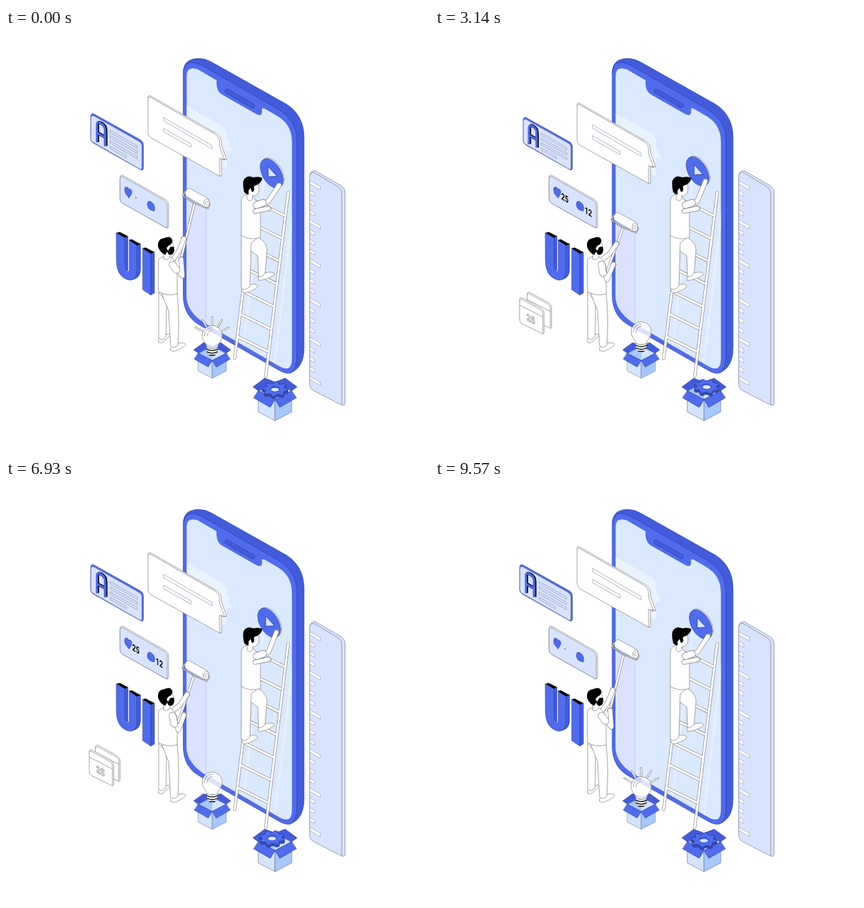
An HTML page for the animation above (9.64 s loop, 640 px wide and 640 px high).

```html
<!DOCTYPE html>
<html lang="en">
<head>
<meta charset="utf-8">
<title>Building an app interface</title>
<style>
  html, body { margin: 0; height: 100%; overflow: hidden; background: #fff; }
  svg { display: block; width: 100vw; height: 100vh; }
  path, ellipse, circle { stroke-linejoin: round; stroke-linecap: round; }
  .blue { fill: #4f6cef; stroke: #2b3c94; stroke-width: .6; }
  .dark { fill: #415bdb; stroke: #2b3c94; stroke-width: .6; }
  .pale { fill: #d8e3ff; stroke: #6f7890; stroke-width: .7; }
  .white { fill: #fff; stroke: #777; stroke-width: .7; }
  .line { fill: none; stroke: #777; stroke-width: .7; }
  .bar { fill: none; stroke: #8a93aa; stroke-width: .7; }
  .edge { fill: none; stroke: #777; }
  .core { fill: none; stroke: #fff; }
  text { font: bold 14px Roboto, sans-serif; text-anchor: middle; }
</style>
</head>
<body>
<svg viewBox="0 0 640 640">
  <defs>
    <path id="screenShape" d="M273 72Q273 57 290 62L319 79V86Q320 97 328 101L379 130Q387 134 387 127V122Q388 120 392 122L411 133Q433 146 433 172V500Q433 522 415 513L306 450Q273 431 273 405Z"/>
    <clipPath id="screen"><use href="#screenShape"/></clipPath>
    <path id="bubbleShape" d="M215 105Q215 101 219 103L317 159Q325 164 326 171V177L334 199L326 198V224L323 224L219 166Q215 163 215 159Z"/>
    <g id="calendar">
      <path class="white" d="M-18.500-25Q-18.500-29-15-28L14-12Q18.500-9 18.500-5V24Q18.500 28 15 26L-15 11Q-18.500 9-18.500 5Z"/>
      <path class="line" d="M-18.500-24Q-18-27-14-25L13-10Q16.500-8 16.500-4V26M-18.500-17L16.500 1"/>
      <text transform="matrix(.82 .47 0 1 -1.500 9)" fill="none" stroke="#777" stroke-width=".7">25</text>
    </g>
    <g id="boxBack">
      <path d="M-21-11L0-22V0Z" fill="#a6c7ff"/>
      <path d="M0-22L21-11L0 0Z" fill="#d3e4ff"/>
      <path d="M-21-11L0 0V27L-21 16Z" fill="#d3e4ff" stroke="#6f7890" stroke-width=".6"/>
      <path d="M21-11L0 0V27L21 16Z" fill="#a6c7ff" stroke="#6f7890" stroke-width=".6"/>
      <path class="dark" d="M-21-11L-28-16L-13-27L0-22ZM21-11L28-16L13-27L0-22Z"/>
    </g>
    <path id="boxFront" class="blue" d="M-21-11L0 0L-6 10L-27-2ZM21-11L0 0L6 10L27-2Z"/>
  </defs>

  <!-- phone -->
  <path class="dark" d="M268 68Q268 46 292 46Q302 46 312 52L424 115Q451 132 451 166V484Q451 514 430 522Z"/>
  <path class="blue" d="M268 70Q269 43 297 57L412 123Q440 140 440 170V496Q440 532 415 519L292 449Q268 435 268 404Z"/>
  <use href="#screenShape" fill="#dbe9ff" stroke="#4459b8" stroke-width=".6"/>
  <path d="M334.500 95.500L373 117.500" fill="none" stroke="#2b3c94" stroke-width="7"/>
  <path d="M334.500 95.500L373 117.500" fill="none" stroke="#415bdb" stroke-width="6"/>
  <g clip-path="url(#screen)">
    <path id="paint" fill="#dae2ff" stroke="#b4bff0" stroke-width=".7"/>
    <use id="reflection" href="#bubbleShape" fill="#fff" opacity=".38"/>
    <path d="M358 492L391 221M405 519L439 240" fill="none" stroke="#fff" stroke-width="3" opacity=".3"/>
  </g>

  <!-- speech bubble -->
  <g id="bubble">
    <use href="#bubbleShape" class="white"/>
    <path class="line" d="M215 106Q216 103 219 105L315 160Q323 165 323 172V179L331 200L323 197V224"/>
    <path class="bar" d="M238.500 135.500L312 178V183L238.500 140.500ZM238.500 152L280 175.500V180.500L238.500 157Z"/>
  </g>

  <!-- profile card -->
  <g id="profile">
    <path class="blue" d="M128 135Q128 128 133 130L203 169Q208 172 208 178V211Q208 217 203 214L132 174Q128 171 128 168Z"/>
    <path class="pale" d="M128.500 137Q128.500 131 133 133L201 171.500Q205.500 174 205.500 179V211Q205.500 215 202 213L132 173Q128.500 171 128.500 168Z"/>
    <g fill="none" stroke="#0a0d22" stroke-width="5" style="stroke-linecap:butt">
      <path id="letter" d="M137.500 173V148Q137.500 141 143.500 144.500Q150 148 150 156V179M137.500 159L150 166" transform="translate(1 -.4)" style="stroke-linecap:butt"/>
    </g>
    <use href="#letter" x="-1" fill="none" stroke="#4f6cef" stroke-width="3.200"/>
    <path id="cardLines" class="bar"/>
  </g>

  <!-- reactions card -->
  <path class="white" d="M172.500 227Q173 221 177 223L242 260Q246 263 246 268V299Q246 304 242 302L176 265Q172.500 263 172.500 259Z"/>
  <path class="pale" d="M172.500 228Q173 223 177 225L240 261Q244 264 244 269V302L242 302L176 265Q172.500 263 172.500 259Z"/>
  <path class="blue" d="M186 257L180.500 250Q178 241 182 240.500Q184.500 240.500 186 244Q188 242 190 246Q191.500 251 186 257Z"/>
  <g id="chat"><path class="blue" d="M214 267Q214 260 219.500 263Q225 266.500 225 272L224.500 277L220.500 276Q214 274 214 267Z"/></g>
  <g id="likes"><text transform="matrix(.68 .42 0 1 0 5)">25</text></g>
  <g id="replies"><text transform="matrix(.68 .42 0 1 0 5)">12</text></g>

  <!-- UI letters -->
  <path class="dark" d="M180 317L184.500 315V367H180ZM198 328L203.500 326V366Q203 380 188 381L184 378Z"/>
  <path class="blue" d="M167 310L180 317V360Q181 367 184 368.500Q186.500 369 186.500 365V320L198 327V367Q198 384 184 381Q167 375 167 352Z"/>
  <path class="dark" d="M219 341L224.500 339V401L219 404Z"/>
  <path class="blue" d="M207 333L219 341V404L207 396Z"/>
  <path d="M167 310L172 308.500L184.500 315L180 317.500ZM186 321L190 319.500L203.500 327L198 329ZM207 333.500L211 332L224.500 339L219 341.500Z"/>
  <g id="calendars"></g>

  <!-- ruler -->
  <path class="pale" d="M459.500 224Q460 215 468 216L506 238Q513 242 513 250V567Q513 572 508 570.500L466 549Q459.500 546 459.500 538Z"/>
  <path class="line" d="M460 222Q462 217 467 219L502 240Q508 243 508 251V570.500"/>
  <path id="marks" fill="#fff" stroke="#8a93aa" stroke-width=".6"/>

  <!-- play button -->
  <g id="play">
    <circle r="20" class="white" transform="matrix(.866 .5 0 1 1.500 -1)"/>
    <g transform="matrix(.866 .5 0 1 0 0)">
      <circle r="20" class="blue"/>
      <path d="M-6-7V8L9 0Z" fill="#d8e6ff" stroke="#2b3c94" stroke-width=".8"/>
    </g>
  </g>

  <!-- ladder and climber -->
  <g id="ladder"></g>
  <path class="white" d="M382 382Q380 377 384 375L394 370Q405 368 406 372Q406 375 393 380Z"/>
  <path class="white" d="M368 316L382 317Q395 325 395 336L392 371Q388 377 382 376L381 345L366 334Z"/>
  <path class="white" d="M357 398Q355 393 359 391L369 388Q380 386 381 391Q380 394 368 399Q361 403 357 398Z"/>
  <path class="white" d="M356 312V394Q362 398 369 391L371 325L380 318Z"/>
  <path class="white" d="M357 257Q363 248 372 254L379 262Q385 268 385 282V317Q370 322 356 314V264Z"/>
  <path class="white" d="M365 244L382 236Q384 245 381 250Q378 255 373 254V259Q369 264 365 259Z"/>
  <path d="M360 247Q357 232 361 228Q366 222 374 226Q383 224 388 227Q386 236 377 238L375 240Q377 248 372 248L370 242L367 246V252Q361 251 360 247Z"/>
  <g id="climberGrip"></g>
  <g id="climberReach"></g>

  <!-- roller and painter -->
  <g id="stick"></g>
  <g id="roller">
    <path d="M271 247L268 254L285 265L305 273L308 267" fill="none" stroke="#555e78" stroke-width="2.400"/>
    <path d="M271 247L268 254L285 265L305 273L308 267" class="core" stroke-width="1"/>
    <path class="white" d="M272 254Q269 246 277 242L306 258Q309 264 305 271L301 271Z"/>
    <ellipse class="white" cx="303.500" cy="265" rx="4.300" ry="6.200"/>
    <path class="line" d="M305 266Q302 269 301.500 265Q303 260 306 264"/>
  </g>
  <g id="farArm"></g>
  <path class="white" d="M231 475Q229 471 233 469L240 464Q249 462 249 465L238 475Q233 478 231 475Z"/>
  <path class="white" d="M249 487Q248 483 252 481L260 477Q271 475 272 479Q270 483 258 488Q252 491 249 487Z"/>
  <path class="white" d="M231 400V469Q236 475 242 467L243 415Z"/>
  <path class="white" d="M236 402L259 402Q263 440 260 480Q254 486 249 481L246 428Z"/>
  <path class="white" d="M231 350Q238 343 249 347Q258 352 259 364V402Q245 407 231 399Z"/>
  <path class="white" d="M239 336L251 323Q255 330 254 338L248 344Q247 352 239 350Z"/>
  <path d="M230 331Q229 319 239 318Q250 313 252 322Q250 329 246 329L243 333L245 337L249 331L254 331Q256 341 250 343Q245 344 244 338L241 343Q234 341 230 331Z"/>
  <g id="nearArm"></g>

  <!-- boxes -->
  <use href="#boxBack" transform="translate(312 503)"/>
  <use href="#boxBack" transform="translate(407 562) scale(1.190)"/>
  <g id="bulb">
    <g id="rays"></g>
    <path d="M304 484Q304 479 300 475A15.300 15.300 0 1 1 324 475Q320 479 320 484Z" fill="#fff" fill-opacity=".8" stroke="#777" stroke-width=".7"/>
    <path class="line" d="M300 466Q301 454 312 453.500M304 466Q305 458 312 457"/>
    <path class="white" d="M304 483Q312 487 320 483V491L315 496H309L304 491Z"/>
    <path d="M304 486Q312 490 320 486M304.500 490Q312 494 319.500 490M308 495H316" fill="none" stroke="#111" stroke-width="1.500"/>
  </g>
  <use href="#boxFront" transform="translate(312 503)"/>
  <use href="#boxFront" transform="translate(407 562) scale(1.190)"/>
  <g id="gear">
    <path id="gearSide" class="dark"/>
    <path id="gearTop" class="blue"/>
    <ellipse class="dark" rx="7" ry="4"/>
    <ellipse fill="#dbe9ff" cy="1" rx="6" ry="2.700"/>
  </g>
</svg>

<script>
const LOOP = 9640;
const $ = id => document.getElementById(id);
const set = (id, name, value) => $(id).setAttribute(name, value);
const place = (id, x, y, s = 1) => set(id, 'transform', `translate(${x} ${y}) scale(${s})`);
const range = n => [...Array(n).keys()];
const clamp = x => Math.max(0, Math.min(1, x));
const smooth = x => (x = clamp(x), x * x * (3 - 2 * x));
const ease = x => x * x * x * (10 + x * (6 * x - 15));
const mix = (a, b, p) => a.map((v, i) => v + (b[i] - v) * p);
// 0 to 1 from `rise`, back to 0 from `fall`
const pulse = (t, rise, fall, span = 900) => smooth((t - rise) / span) - smooth((t - fall) / span);
// 0 to 1 and back once per period
const swing = (t, period) => 1 - Math.abs(1 - (t % period) / (period / 2));

const tube = (d, width) =>
  `<path class="edge" stroke-width="${width}" d="${d}"/><path class="core" stroke-width="${width - 1.3}" d="${d}"/>`;
const polyline = points => 'M' + points.map(p => p.join(' ')).join('L');
function limb(id, points, sleeveEnd) {
  const [x, y] = points[points.length - 1];
  $(id).innerHTML = `<circle class="white" cx="${x}" cy="${y}" r="4"/>` + tube(polyline(points), 7.5)
    + (sleeveEnd ? tube(polyline([points[0], sleeveEnd]), 11) : '');
}
const slat = (x, y, w, h) => `M${x} ${y}l${w} ${w * .577}v${h}l${-w} ${-w * .577}Z`;

set('cardLines', 'd', range(4).map(i => slat(158, 155 + i * 8, i < 3 ? 41 : 24, 3.5)).join(''));
set('marks', 'd', range(21).map(i => slat(460, 231 + i * 14.8, i % 4 ? 7 : 15.5, 5)).join(''));

const rungs = range(7).map(i => {
  const y = 261 + i * 34.3, x = 346 + (500 - y) * .122;
  return `M${x} ${y}l44.500 22`;
});
$('ladder').innerHTML = tube(rungs.join('') + 'M346 500L374.700 265M393 527L427 249', 4.6);
limb('climberGrip', [[377, 277], [397, 273]]);

const SHEETS = 4;
$('calendars').innerHTML = range(SHEETS).map(i => `<use id="sheet${i}" href="#calendar"/>`).reverse().join('');

function gearPath(turn, drop) {
  return polyline(range(32).map(i => {
    const a = turn + (i + (i % 2) * .2) * Math.PI / 16, r = i % 4 < 2 ? 19.5 : 15;
    return [r * Math.cos(a), drop + r * .56 * Math.sin(a)];
  })) + 'Z';
}

function drawPainter(u) {
  const v = clamp(u / .7), p = (v + smooth(v)) / 2, drop = 38 * p;
  place('roller', -p, drop);
  set('paint', 'd', `M260 ${245 + drop}L302.500 ${270 + drop}V480H260Z`);
  $('stick').innerHTML = tube(polyline([[285 - p, 266 + drop], mix([264, 353], [259, 373], p)]), 4);
  limb('farArm', [[253, 350], mix([262, 337], [264, 342], p), mix([269, 319], [275, 327], p)]);
  limb('nearArm', [[252, 358], mix([267, 375], [260, 381], p), mix([265, 350], [270, 358], p)],
    mix([258, 366], [254, 371], p));
}

function drawClimber(t) {
  const sway = Math.sin(Math.PI * t / LOOP) ** 2, nudge = pulse(t, 0, 1400, 1300);
  place('play', 402 - 6.5 * sway - 6.5 * nudge, 220 - 4 * sway - 2 * nudge);
  const hand = mix([413, 238], [409, 232], pulse(t, 0, 7000, 1500));
  limb('climberReach', [[379, 268], [397, 262], hand], [389, 264.5]);
}

function drawBulb(t) {
  place('bulb', 0, -7 * ease(swing(t, LOOP / 2)));
  const length = 12 * (1 - pulse(t, 1100, 6900));
  const rays = range(5).map(i => {
    const a = (i - 2) * .55, dx = Math.sin(a), dy = -Math.cos(a);
    return `M${312 + 16.5 * dx} ${466 + 16.5 * dy}l${length * dx} ${length * dy}`;
  });
  $('rays').innerHTML = length > .2 ? tube(rays.join(''), 2.8) : '';
}

function drawGear(t) {
  const turn = t / LOOP * 2 * Math.PI;
  place('gear', 407 + 4.5 * Math.sin(turn), 543.5 + 2.7 * Math.cos(turn));
  set('gearSide', 'd', range(5).map(h => gearPath(-turn, h)).join(''));
  set('gearTop', 'd', gearPath(-turn, 0));
}

// Each sheet pops up at the back, steps forward twice and shrinks away.
function drawSheet(i, t) {
  const age = t - i * 1700;
  const [first, second, last] = range(3).map(k => smooth((age - 1050 - k * 1600) / 700));
  const row = first + second + last * .65;
  const size = smooth(age / 900) * (1 - last) * (1 - smooth((t - 8800) / 700));
  place('sheet' + i, 163.5 - 9.5 * row, 423.7 + 7 * row, size);
}

function draw(t) {
  const u = swing(t, LOOP), sink = 14.5 * ease(u);
  place('bubble', 0, sink);
  place('reflection', 8, sink - 12);
  drawPainter(u);
  drawClimber(t);
  drawBulb(t);
  drawGear(t);
  range(SHEETS).forEach(i => drawSheet(i, t));

  const card = 1 - pulse(t, 3000, 4900);
  place('profile', 208 * (1 - card), 215 * (1 - card), card);
  place('likes', 196.5, 257, .2 + .8 * pulse(t, 0, 7600));
  place('replies', 232, 278, pulse(t, 1500, 8100));
  const tilt = pulse(t, 300, 1350);
  set('chat', 'transform', `translate(${-2 * tilt} ${-tilt}) rotate(${-14 * tilt} 219.500 270)`);
}

function tick(now) {
  draw(now % LOOP);
  requestAnimationFrame(tick);
}
requestAnimationFrame(tick);
</script>
</body>
</html>
```
